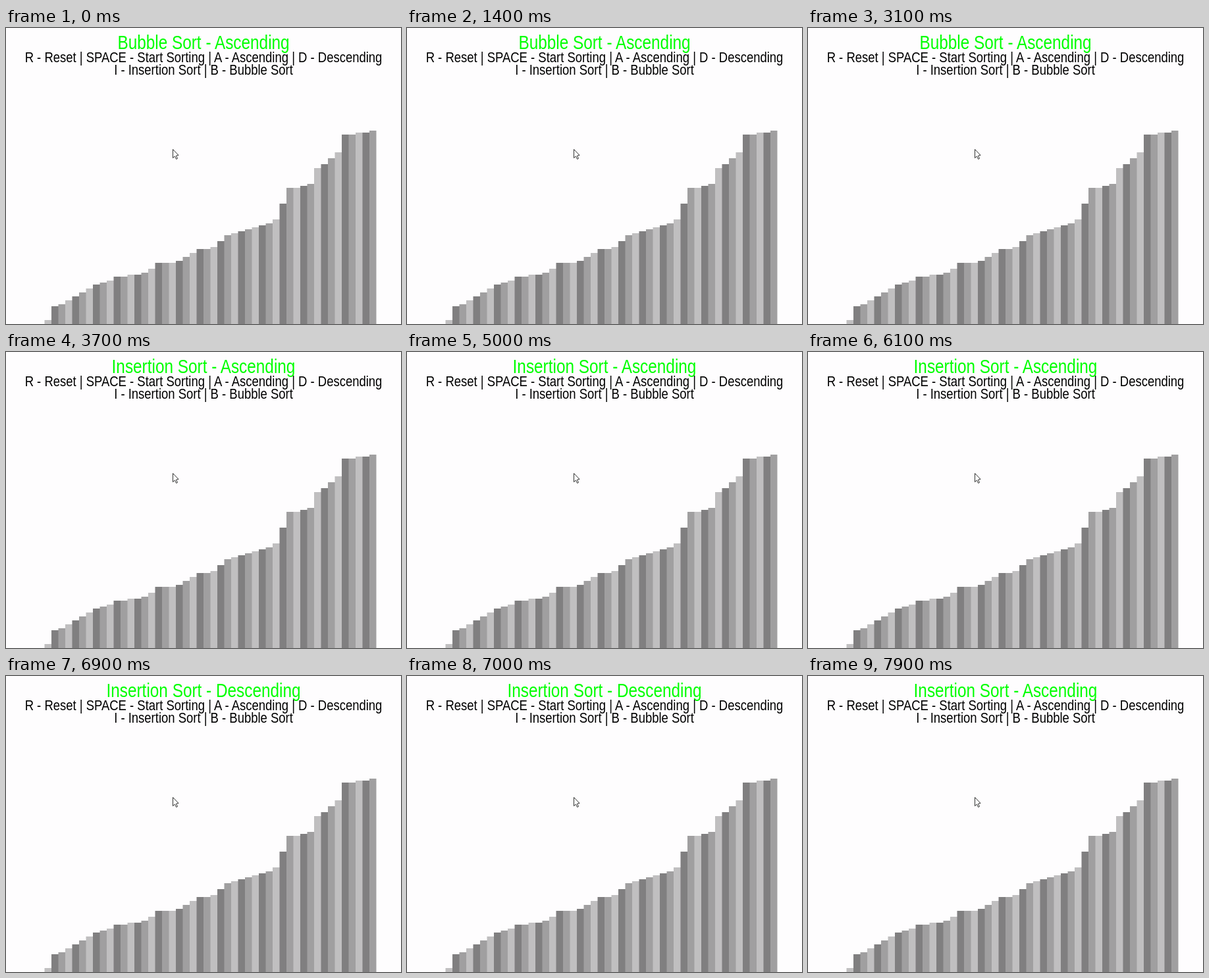
Recreate the animation shown at these times as an HTML page. Size 600x450 px, loop 8000 ms.

```html
<!DOCTYPE html>
<html lang="en">
<head>
<meta charset="utf-8">
<title>Sorting visualizer</title>
<style>
  html, body { margin: 0; width: 100%; height: 100%; overflow: hidden; background: #fefdfe; }
  svg { display: block; width: 600px; height: 450px; }
  text { font-family: "Liberation Sans", Arial, sans-serif; font-size: 22.75px; text-anchor: middle; }
  #title { font-size: 30px; fill: #0f0; }
</style>
</head>
<body>
<svg viewBox="0 0 600 450">
  <g id="bars"></g>
  <!-- narrow face: one condense factor for all text -->
  <g transform="translate(300 0) scale(.812 1)">
    <text id="title" y="32"></text>
    <text y="52">R - Reset | SPACE - Start Sorting | A - Ascending | D - Descending</text>
    <text y="71">I - Insertion Sort | B - Bubble Sort</text>
  </g>
  <path d="M253.5 184.5V197.6L256.5 194.9L258.6 199.4L260.5 198.5L258.5 194.1L262 193.4Z"
        fill="#fff" stroke="#333" stroke-width="1"/>
</svg>
<script>
const LOOP = 8000, COUNT = 50, BAR = 10.5, LEFT = 37.5, FLOOR = 450, UNIT = 3;
const grays = ["#807f80", "#a09fa0", "#c0bfc0"];

// [bar, value] corners of the sorted slope; bars between them are interpolated
const slope = [[2, 2], [3, 9], [9, 20], [12, 24], [16, 26], [18, 31], [20, 31], [24, 38], [26, 39],
  [28, 45], [35, 53], [37, 69], [40, 71], [41, 79], [44, 87], [45, 96], [49, 98]];

const steps = [
  [0, "Bubble Sort - Ascending"],
  [3700, "Insertion Sort - Ascending"],
  [5300, "Insertion Sort - Descending"],
  [5900, "Insertion Sort - Ascending"],
  [6800, "Insertion Sort - Descending"],
  [7300, "Insertion Sort - Ascending"]
];

function valueAt(i) {
  const k = Math.max(1, slope.findIndex(([bar]) => bar >= i));
  const [i0, v0] = slope[k - 1], [i1, v1] = slope[k];
  return Math.floor(v0 + (v1 - v0) * (i - i0) / (i1 - i0) + .1);
}

function addBar(i) {
  const bar = document.createElementNS("http://www.w3.org/2000/svg", "rect");
  const height = UNIT * valueAt(i);
  // half a pixel of overlap hides the seam under the next bar
  const width = BAR + (i < COUNT - 1 ? .5 : 0);
  const attrs = { x: LEFT + BAR * i, y: FLOOR - height, width, height, fill: grays[i % 3] };
  for (const key in attrs) bar.setAttribute(key, attrs[key]);
  document.getElementById("bars").append(bar);
}
for (let i = slope[0][0]; i < COUNT; i++) addBar(i);

const title = document.getElementById("title");
const start = performance.now();
function draw(now) {
  const t = Math.max(0, now - start) % LOOP;
  const label = steps.filter(([at]) => at <= t).pop()[1];
  if (title.textContent !== label) title.textContent = label;
  requestAnimationFrame(draw);
}
draw(start);
</script>
</body>
</html>
```
